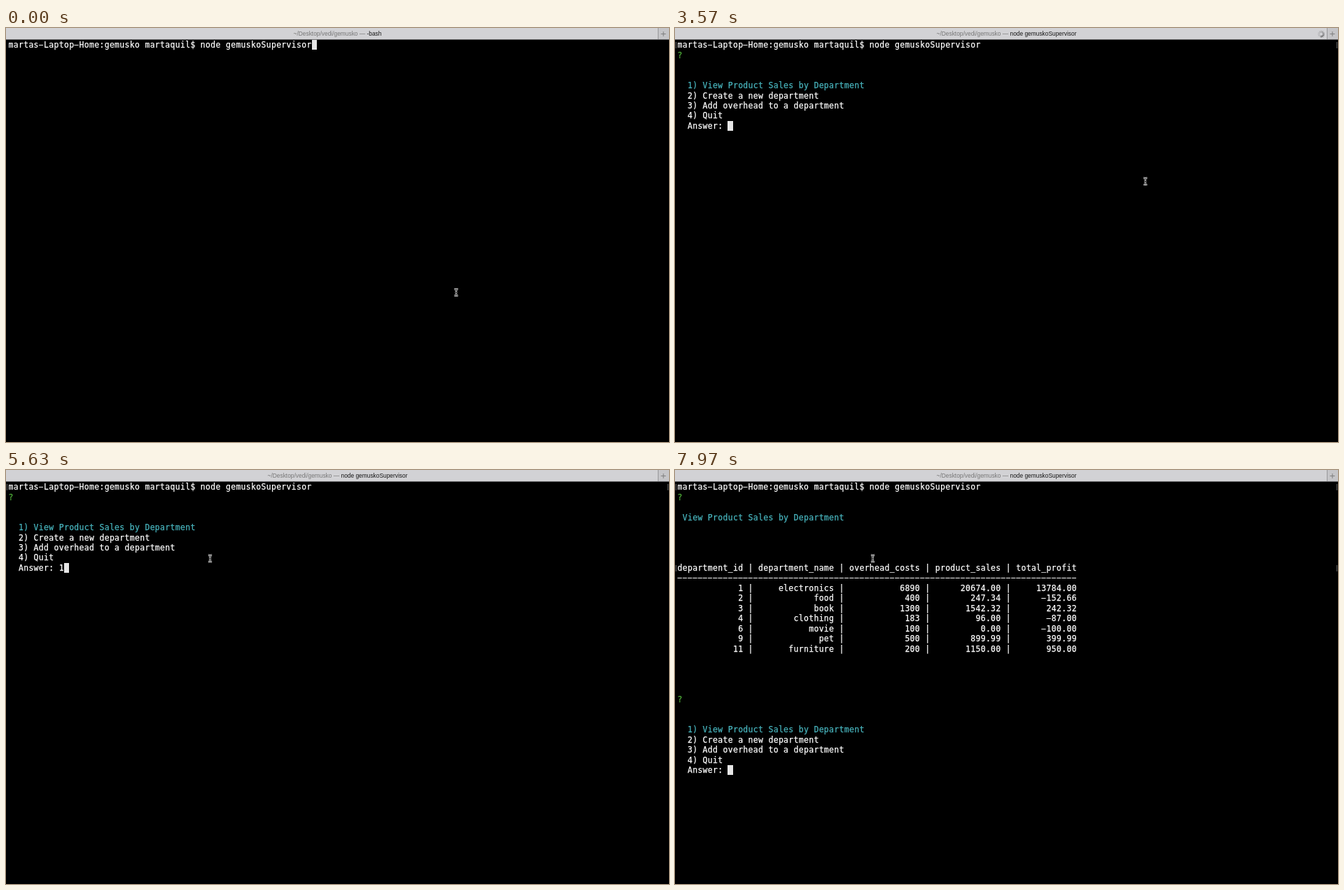
These frames come from a looping animation (947 by 592 pixels, 8000 ms). An HTML page:

```html
<!DOCTYPE html>
<html lang="en">
<head>
<meta charset="utf-8">
<title>Terminal session</title>
<style>
  html, body { margin: 0; width: 100%; height: 100%; overflow: hidden; background: #000; }
  #stage { position: relative; width: 947px; height: 592px; overflow: hidden; background: #000; }
  #bar {
    position: absolute; inset: 0 0 auto; height: 16px;
    background: #d2d2d5; border-bottom: 1px solid #6a6a6c;
    font: 8.4px/17px "Liberation Sans", Arial, sans-serif; color: #777;
    text-align: center; white-space: pre;
  }
  #bar b { font-weight: normal; color: #161616; }
  #tab {
    position: absolute; right: 0; top: 0; width: 15px; height: 16px;
    background: #c5c5c8; border-left: 1px solid #98989a;
  }
  pre {
    position: absolute; left: 3.5px; top: 17.2px; margin: 0; color: #fff;
    font: 11.4px/14.47px "DejaVu Sans Mono", monospace; letter-spacing: .362px;
    -webkit-text-stroke: .25px;
  }
  .cyan { color: #48b5be; }
  .green { color: #4fae3a; }
  .caret, .mark { position: absolute; }
  .caret { width: 7.8px; height: 14.2px; background: #e6e6e6; }
  .mark {
    left: 1px; width: 943px; height: 9px;
    border: solid #666; border-width: 0 1px;
  }
  svg { position: absolute; inset: 0; fill: none; }
</style>
</head>
<body>
<div id="stage">
  <div id="bar"><span id="title"></span><div id="tab"></div></div>
  <div id="marks"></div>
  <pre id="text"></pre>
  <div class="caret" id="caret"></div>
  <svg width="947" height="592">
    <defs>
      <path id="beam" d="M-2.6-4.8Q0-4.8 0-3Q0-4.8 2.6-4.8M0-3V3M-1.4 .3H1.4M-2.6 4.8Q0 4.8 0 3Q0 4.8 2.6 4.8"/>
    </defs>
    <path d="M935.5 8.5h7M939 5v7" stroke="#777" stroke-width=".9"/>
    <g id="spinner" stroke="#333" stroke-width="1" stroke-linecap="round"></g>
    <g id="mouse">
      <use href="#beam" stroke="#f2f2f2" stroke-width="2.4"/>
      <use href="#beam" stroke="#000" stroke-width=".8"/>
    </g>
  </svg>
</div>
<script>
const LOOP = 8000, COL = 7.225, ROW = 14.47, LEFT = 3.1, TOP = 16.8;
const $ = id => document.getElementById(id);
const paint = (name, text) => `<span class="${name}">${text}</span>`;
const wideDash = text => text.replaceAll('-', '\u2212');

const prompt = wideDash('martas-Laptop-Home:gemusko martaquil$ node gemuskoSupervisor');
const choice = 'View Product Sales by Department';
const menu = [
  paint('green', '?'), '', '',
  paint('cyan', '  1) ' + choice),
  '  2) Create a new department',
  '  3) Add overhead to a department',
  '  4) Quit',
  '  Answer: '
];

const headers = ['department_id', 'department_name', 'overhead_costs', 'product_sales', 'total_profit'];
const records = [
  '1 electronics 6890 20674.00 13784.00',
  '2 food 400 247.34 -152.66',
  '3 book 1300 1542.32 242.32',
  '4 clothing 183 96.00 -87.00',
  '6 movie 100 0.00 -100.00',
  '9 pet 500 899.99 399.99',
  '11 furniture 200 1150.00 950.00'
];
const tableRow = cells => cells.map((cell, i) => cell.padStart(headers[i].length)).join(' | ');
const table = [
  tableRow(headers),
  '-'.repeat(tableRow(headers).length),
  ...records.map(record => tableRow(record.split(' ')))
].map(wideDash);

// Each screen: start time, lines, caret column and row, rows with edge marks
const screens = [
  { at: 0, lines: [prompt], caret: [60, 0], marks: [] },
  { at: 2200, lines: [prompt], caret: [0, 1], marks: [0] },
  { at: 3100, lines: [prompt, ...menu], caret: [10, 8], marks: [0] },
  { at: 5560, lines: [prompt, ...menu.slice(0, -1), '  Answer: 1'], caret: [11, 8], marks: [0] },
  {
    at: 6500,
    lines: [prompt, menu[0], '', paint('cyan', ' ' + choice), '', '', '', '',
            ...table, '', '', '', '', ...menu],
    caret: [10, 28], marks: [0, 8]
  }
];

// Pointer path: time, x, y
const path = [
  [0, 643, 378], [940, 643, 378], [1100, 595, 315], [1190, 514, 218], [1270, 528, 200],
  [1400, 528, 200], [1490, 590, 196], [1570, 675, 225], [3400, 675, 225], [3570, 672, 219.5],
  [3830, 625, 176], [4000, 400, 122], [4170, 213, 97.5], [4350, 214, 98], [4670, 268, 121],
  [4950, 291.5, 126.5], [7650, 291.5, 126.5], [7970, 282.5, 126.5], [LOOP, 282.5, 126.5]
];

function pointerAt(t) {
  const i = path.findIndex(point => point[0] > t);
  const [t0, x0, y0] = path[i - 1], [t1, x1, y1] = path[i];
  const k = (t - t0) / (t1 - t0);
  return [x0 + (x1 - x0) * k, y0 + (y1 - y0) * k];
}

let shown;
function showScreen(screen) {
  if (screen === shown) return;
  shown = screen;
  const [col, row] = screen.caret;
  $('text').innerHTML = screen.lines.join('\n');
  $('caret').style.left = LEFT + col * COL + 'px';
  $('caret').style.top = TOP + row * ROW + 'px';
  $('marks').innerHTML = screen.marks
    .map(r => `<div class="mark" style="top:${TOP + r * ROW + 3}px"></div>`).join('');
}

const SPOKES = 12;
$('spinner').innerHTML = Array.from({ length: SPOKES }, (_, i) =>
  `<path d="M0-2.6V-4.6" transform="translate(923 8.7) rotate(${i * 360 / SPOKES})"/>`).join('');
const spokes = [...$('spinner').children];

let command;
function showTitle(text) {
  if (text === command) return;
  command = text;
  $('title').innerHTML = `~/Desktop/vedi/gemusko — <b>${text}</b>`;
}

function draw(t) {
  showScreen(screens.findLast(screen => screen.at <= t));
  showTitle(t < 2330 ? '-bash' : 'node gemuskoSupervisor');
  $('mouse').setAttribute('transform', `translate(${pointerAt(t)})`);
  const busy = t >= 2500 && t < 5630;
  $('spinner').style.display = busy ? '' : 'none';
  const head = Math.floor(t / 1000 * SPOKES);
  spokes.forEach((spoke, i) => {
    const age = ((head - i) % SPOKES + SPOKES) % SPOKES;
    spoke.style.opacity = Math.max(.2, .9 - age * .09);
  });
}

const start = performance.now();
function tick() {
  draw((performance.now() - start) % LOOP);
  requestAnimationFrame(tick);
}
tick();
</script>
</body>
</html>
```
